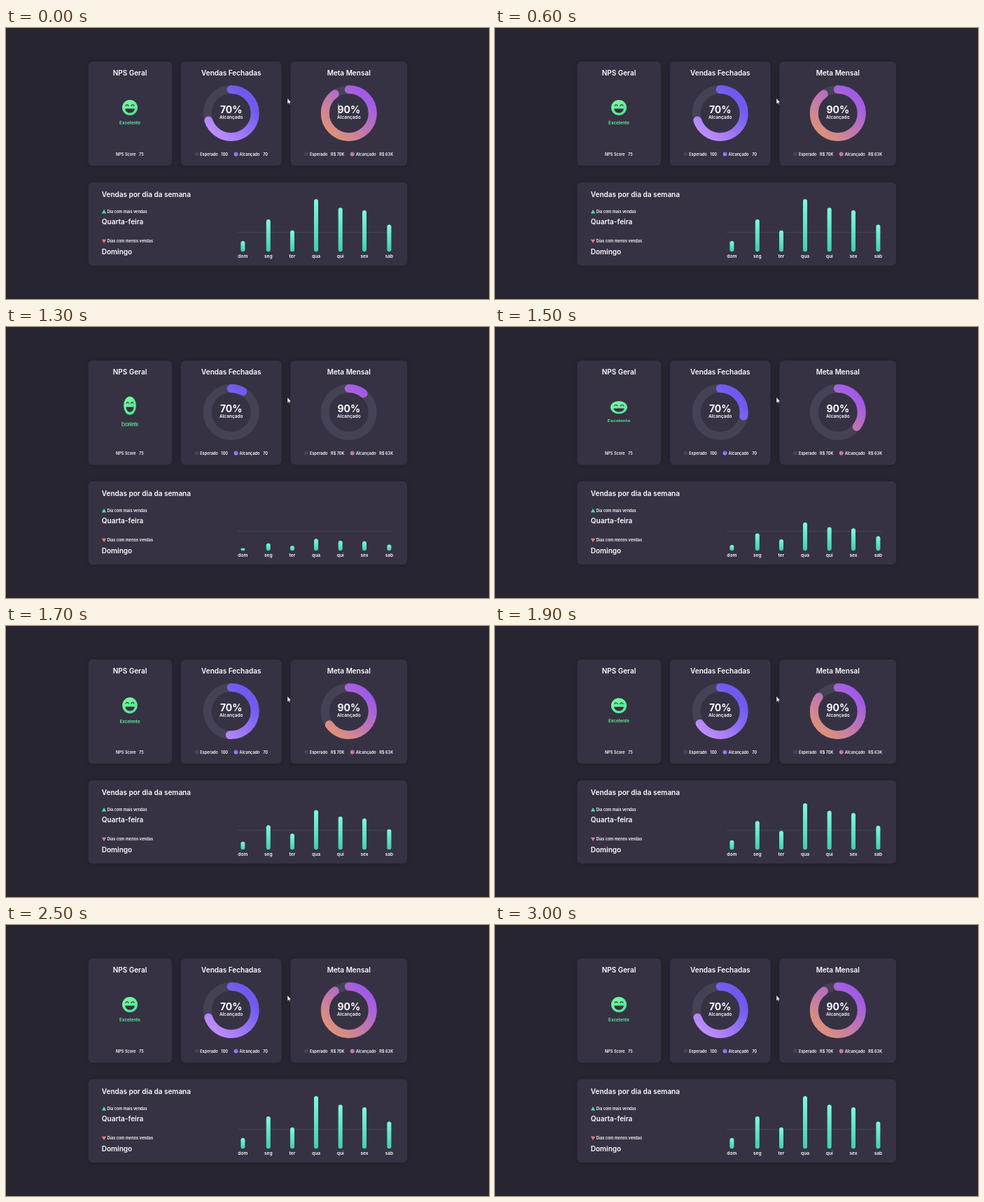
These frames come from a looping animation (690x388 px, 5.7 s). An HTML page with a canvas:

```html
<!DOCTYPE html>
<html lang="pt-BR">
<head>
<meta charset="utf-8">
<title>Painel de vendas</title>
<style>
html, body { margin: 0; width: 100%; height: 100%; overflow: hidden; background: #282533; }
canvas { display: block; width: 690px; height: 388px; }
</style>
</head>
<body>
<canvas id="stage"></canvas>
<script>
const W = 690, H = 388, LOOP = 5700, STEP = 100;
const START = 1062, RESET = 1100;
const canvas = document.getElementById('stage');
const ctx = canvas.getContext('2d');
const dpr = window.devicePixelRatio || 1;
canvas.width = W * dpr;
canvas.height = H * dpr;

const CARD = '#363244', TRACK = '#454255', WHITE = '#fdfcff';
const bars = [
  ['dom', 338.4, 15.3], ['seg', 374.8, 46.3], ['ter', 409, 30.5], ['qua', 443, 75.2],
  ['qui', 477.7, 63], ['sex', 512, 59.4], ['sab', 547.4, 38.8]
];
// time, scale x, scale y
const wobble = [
  [START, 1, 1], [1350, .8, 1.2], [1500, 1.09, .84], [1600, .93, 1.08],
  [1700, .98, 1.04], [1800, 1.04, .96], [2050, 1, 1]
];

const clamp = v => Math.max(0, Math.min(1, v));
const mix = (a, b, k) => a + (b - a) * k;

function bezier(x1, y1, x2, y2) {
  const at = (a, b, s) => 3 * a * s * (1 - s) ** 2 + 3 * b * s * s * (1 - s) + s ** 3;
  return x => {
    if (x <= 0 || x >= 1) return clamp(x);
    let lo = 0, hi = 1;
    for (let i = 0; i < 24; i++) {
      const mid = (lo + hi) / 2;
      if (at(x1, x2, mid) < x) lo = mid; else hi = mid;
    }
    return at(y1, y2, lo);
  };
}
const ease = bezier(.25, .1, .25, 1);
const easeInOut = bezier(.42, 0, .58, 1);

function text(str, x, y, size, align = 'left', weight = 600, color = WHITE) {
  ctx.font = `${weight} ${size}px Inter, "Liberation Sans", sans-serif`;
  ctx.textAlign = align;
  ctx.fillStyle = color;
  ctx.fillText(str, x, y);
}

function gradient(x0, y0, x1, y1, ...colors) {
  const g = ctx.createLinearGradient(x0, y0, x1, y1);
  colors.forEach((c, i) => g.addColorStop(i / (colors.length - 1), c));
  return g;
}

function disc(x, y, r, fill) {
  ctx.fillStyle = fill;
  ctx.beginPath();
  ctx.arc(x, y, r, 0, Math.PI * 2);
  ctx.fill();
}

function poly(fill, ...pts) {
  ctx.fillStyle = fill;
  ctx.beginPath();
  pts.forEach(p => ctx.lineTo(p[0], p[1]));
  ctx.closePath();
  ctx.fill();
}

function card(x, y, w, h) {
  ctx.save();
  ctx.shadowColor = 'rgba(0,0,0,.2)';
  ctx.shadowBlur = 10 * dpr;
  ctx.fillStyle = CARD;
  ctx.beginPath();
  ctx.roundRect(x, y, w, h, 6);
  ctx.fill();
  ctx.restore();
}

function donut(x, y, share, k, label, fill) {
  const top = -Math.PI / 2;
  ctx.lineWidth = 12;
  ctx.lineCap = 'round';
  ctx.strokeStyle = TRACK;
  ctx.beginPath();
  ctx.arc(x, y, 34, 0, Math.PI * 2);
  ctx.stroke();
  ctx.strokeStyle = fill;
  ctx.beginPath();
  ctx.arc(x, y, 34, top, top + Math.max(.002, share * k) * Math.PI * 2);
  ctx.stroke();
  text(label, x, 122, 14, 'center', 700);
  text('Alcançado', x, 130, 6.5, 'center');
}

function legend(x, fill, name, value, valueX) {
  disc(x, 180.5, 3, fill);
  text(name, x + 4.9, 182.5, 5.6);
  text(value, valueX, 182.5, 5.6);
}

function wobbleAt(t) {
  for (let i = 1; i < wobble.length; i++) {
    const a = wobble[i - 1], b = wobble[i];
    if (t >= a[0] && t < b[0]) {
      const k = ease((t - a[0]) / (b[0] - a[0]));
      return [mix(a[1], b[1], k), mix(a[2], b[2], k)];
    }
  }
  return [1, 1];
}

function face(t) {
  const [sx, sy] = wobbleAt(t);
  ctx.save();
  ctx.translate(177, 121);
  ctx.scale(sx, sy);
  ctx.translate(-177, -121);
  disc(177, 114, 11, gradient(170, 104, 184, 125, '#7dfba0', '#4be394'));
  ctx.fillStyle = CARD;
  ctx.beginPath();
  ctx.moveTo(170.2, 115.6);
  ctx.lineTo(183.8, 115.6);
  ctx.bezierCurveTo(183.2, 123.6, 170.8, 123.6, 170.2, 115.6);
  ctx.fill();
  ctx.strokeStyle = CARD;
  ctx.lineWidth = 1.2;
  for (const x of [173, 181]) {
    ctx.beginPath();
    ctx.arc(x, 111.8, 2, Math.PI * 1.05, Math.PI * 1.95);
    ctx.stroke();
  }
  text('Excelente', 177, 138.3, 6.3, 'center', 600, '#62f39b');
  ctx.restore();
}

function chart(k) {
  ctx.fillStyle = '#464356';
  ctx.fillRect(331, 292, 222, 1);
  for (const [name, x, full] of bars) {
    const h = full * k;
    ctx.fillStyle = gradient(0, 320.3 - h, 0, 320.3, '#80f7e1', '#40cfae');
    ctx.beginPath();
    ctx.roundRect(x - 3, 320.3 - h, 6, h, Math.min(3, h / 2));
    ctx.fill();
    text(name, x, 329.3, 6.6, 'center');
  }
}

function pointer() {
  ctx.lineWidth = .6;
  poly('#ffffff', [402, 100.6], [402, 108.8], [403.8, 107.2], [405, 109.8],
    [406.2, 109.2], [405.1, 106.8], [407.4, 106.7]);
  ctx.strokeStyle = '#1b1923';
  ctx.stroke();
}

function draw(t) {
  const since = t >= RESET ? t - START : LOOP;
  const arcK = easeInOut(clamp(since / 1000));
  const barK = ease(clamp(since / 1400));
  ctx.setTransform(dpr, 0, 0, dpr, 0, 0);
  ctx.fillStyle = '#282533';
  ctx.fillRect(0, 0, W, H);
  card(117.5, 48, 119.5, 149);
  card(250, 48, 143.5, 149);
  card(406.5, 48, 166.5, 149);
  card(117.5, 221, 455.5, 119);

  text('NPS Geral', 177, 67.7, 10, 'center');
  text('Vendas Fechadas', 321.7, 67.7, 10, 'center');
  text('Meta Mensal', 489.7, 67.7, 10, 'center');
  face(t);
  text('NPS Score', 157, 182.5, 5.6);
  text('75', 190, 182.5, 5.6);

  donut(321.7, 122, .7, arcK, '70%', gradient(346, 104, 299, 152, '#7059ee', '#bd8dfa'));
  legend(272.3, TRACK, 'Esperado', '100', 307.3);
  legend(328.7, gradient(331, 178, 326, 183, '#7059ee', '#bd8dfa'), 'Alcançado', '70', 367.2);

  donut(489.8, 122, .9, arcK, '90%', gradient(515, 97, 467, 150, '#a05ae9', '#dc907d'));
  legend(429, TRACK, 'Esperado', 'R$ 70K', 464);
  legend(494.8, gradient(497, 178, 492, 183, '#a862d8', '#dc907d'), 'Alcançado', 'R$ 63K', 533.3);

  text('Vendas por dia da semana', 136.8, 241.7, 10);
  poly('#43e6a0', [136.8, 265.6], [140, 260], [143.2, 265.6]);
  text('Dia com mais vendas', 144.5, 264.8, 5.6);
  text('Quarta-feira', 136.8, 281, 10);
  poly('#e27f7f', [136.8, 302.7], [143.2, 302.7], [140, 308.2]);
  text('Dias com menos vendas', 144.5, 307.3, 5.6);
  text('Domingo', 136.8, 324, 10);
  chart(barK);

  if (t < 600) {
    ctx.fillStyle = '#c9c6d4';
    ctx.fillRect(474.4, 108.5, .8, 16);
  }
  pointer();
}

function tick() {
  const t = performance.now() % LOOP;
  draw(Math.floor(t / STEP) * STEP);
  requestAnimationFrame(tick);
}
tick();
</script>
</body>
</html>
```
